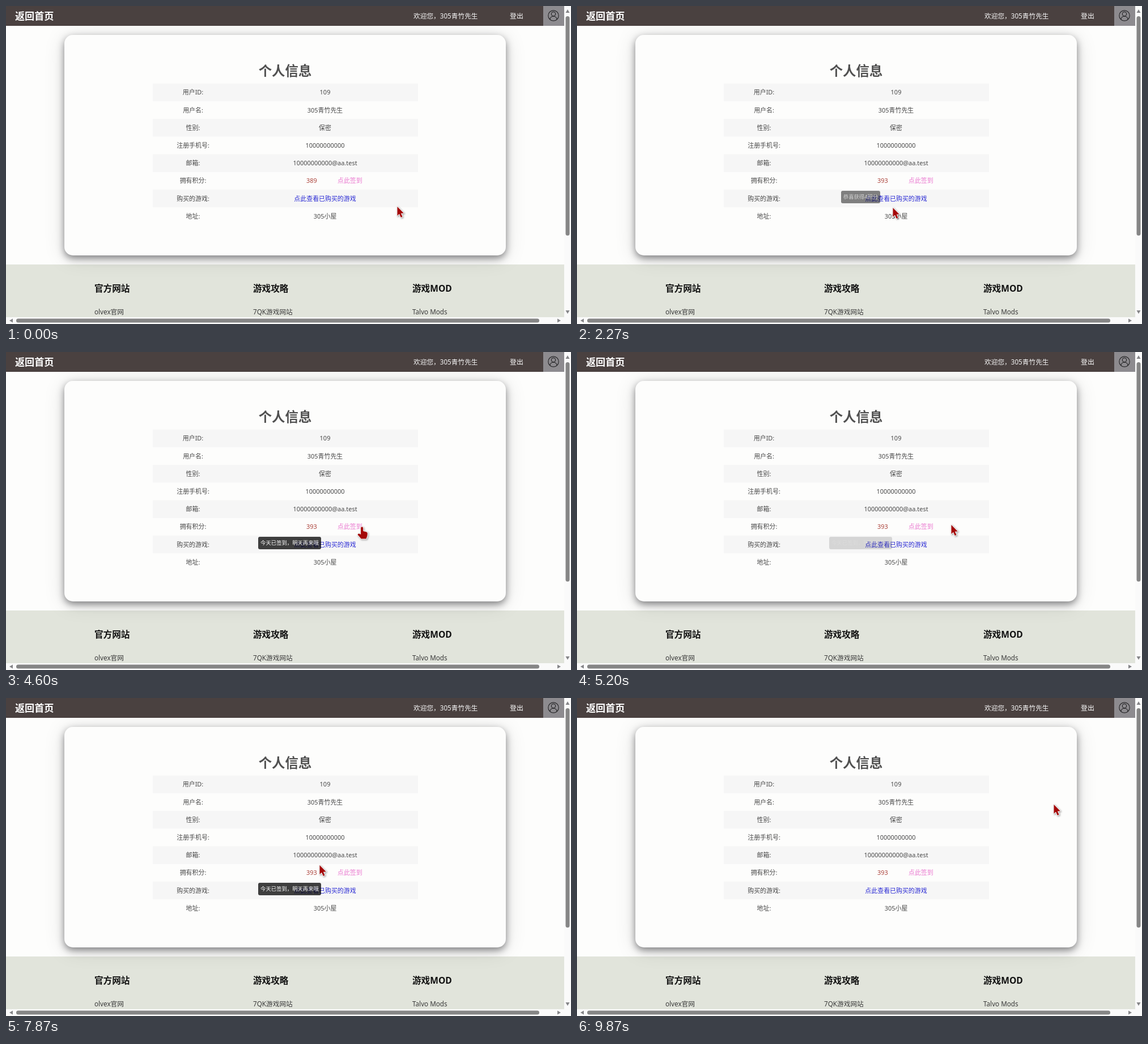
Write an HTML page with a canvas that moves like this. It is 997 px wide and 561 px high and loops after 9940 ms.

```html
<!DOCTYPE html>
<html lang="zh-CN">
<head>
<meta charset="utf-8">
<title>个人信息</title>
<style>
html, body { margin: 0; width: 100%; height: 100%; overflow: hidden; background: #fdfdfc; }
canvas { display: block; }
</style>
</head>
<body>
<canvas id="stage" width="997" height="561"></canvas>
<script>
const W = 997, H = 561, LOOP = 9940;
const FONT = '"Noto Sans", "Noto Sans CJK SC", "Noto Sans CJK", sans-serif';
const ROW_TOP = 136.7, ROW_H = 31.2, LABEL_X = 330, VALUE_X = 563;
const INK = '#484848', PAPER = '#fdfdfc';
const ctx = document.getElementById('stage').getContext('2d');

const rows = [
  ['用户ID:', '109'],
  ['用户名:', '305青竹先生'],
  ['性别:', '保密'],
  ['注册手机号:', '10000000000'],
  ['邮箱:', '10000000000@aa.test'],
  ['拥有积分:', ''],
  ['购买的游戏:', '点此查看已购买的游戏', '#2a2ad4'],
  ['地址:', '305小屋']
];
const columns = [
  [156, '官方网站', 'olvex官网'],
  [436, '游戏攻略', '7QK游戏网站'],
  [717, '游戏MOD', 'Talvo Mods']
];

// time, x, y of the pointer's hot spot
const path = [
  [0, 690, 353], [130, 690, 353], [650, 604, 308], [1450, 604, 308],
  [2150, 557, 355], [2500, 557, 355], [3200, 596, 312], [4200, 596, 312],
  [5000, 660, 304], [5300, 660, 304], [5750, 608, 305], [7000, 608, 305],
  [7700, 553, 294], [8200, 553, 294], [9400, 841, 187], [LOOP, 841, 187]
];
// text, left, width, then times: appear, full, start of fade, gone
const toasts = [
  ['恭喜获得4积分', 466, 69, 800, 1200, 2000, 2770],
  ['今天已签到，明天再来哦', 445, 111, 3480, 3880, 4600, 5330],
  ['今天已签到，明天再来哦', 445, 111, 5870, 6230, 8000, 8650]
];
const SCORE_TIME = 800;

function text(g, str, x, y, size, color, align = 'left', weight = 400) {
  g.font = `${weight} ${size}px ${FONT}`;
  g.textAlign = align;
  g.textBaseline = 'alphabetic';
  g.fillStyle = color;
  g.fillText(str, x, y + size * 0.37);
}

function box(g, x, y, w, h, r, fill) {
  g.fillStyle = fill;
  g.beginPath();
  g.roundRect(x, y, w, h, r);
  g.fill();
}

function polygon(g, points) {
  g.beginPath();
  points.forEach(([x, y]) => g.lineTo(x, y));
  g.closePath();
}

function triangle(g, x, y, dx, dy) {
  polygon(g, [[x + dx * 3, y + dy * 3],
    [x - dx * 3 + dy * 3.5, y - dy * 3 + dx * 3.5],
    [x - dx * 3 - dy * 3.5, y - dy * 3 - dx * 3.5]]);
  g.fillStyle = '#858588';
  g.fill();
}

function drawHeader(g) {
  g.fillStyle = '#4a4140';
  g.fillRect(0, 0, 985, 35);
  text(g, '返回首页', 16, 18, 17.1, '#fff', 'left', 700);
  text(g, '欢迎您，305青竹先生', 719, 17.5, 11.7, '#f6f6f6');
  text(g, '登出', 889, 17.5, 11.9, '#fff', 'left', 500);
  g.fillStyle = '#8d8b8f';
  g.fillRect(948, 0, 37, 35);
  g.strokeStyle = '#2a2a2c';
  g.lineWidth = 1.2;
  g.beginPath();
  g.arc(966, 17, 9.2, 0, 7);
  g.moveTo(969.7, 14);
  g.arc(966, 14, 3.7, 0, 7);
  g.moveTo(960, 23.6);
  g.bezierCurveTo(960.5, 16.2, 971.5, 16.2, 972, 23.6);
  g.stroke();
}

function drawFooter(g) {
  g.fillStyle = '#e1e4db';
  g.fillRect(0, 456, 985, 93);
  for (const [x, title, link] of columns) {
    text(g, title, x, 498, 15.6, '#111', 'left', 700);
    text(g, link, x, 539.5, 11.7, '#3a3a3a');
  }
}

function drawCard(g) {
  const layer = (color, blur, offset) => {
    g.shadowColor = color;
    g.shadowBlur = blur;
    g.shadowOffsetY = offset;
    box(g, 103, 51, 779, 389, 15, PAPER);
  };
  g.save();
  layer('rgba(0,0,0,.12)', 38, 4);
  layer('rgba(40,40,44,.55)', 13, 5);
  g.restore();
  text(g, '个人信息', 492.5, 114, 23.4, '#505050', 'center', 700);
  rows.forEach(([label, value, color = INK], i) => {
    const y = ROW_TOP + ROW_H * i;
    if (i % 2 === 0) {
      g.fillStyle = '#f6f6f6';
      g.fillRect(259, y, 468, ROW_H);
    }
    text(g, label, LABEL_X, y + 15.6, 10.95, INK, 'center');
    text(g, value, VALUE_X, y + 15.6, 10.95, color, 'center');
  });
  text(g, '点此签到', 585, 308.3, 10.95, '#ea78d0');
}

function drawScrollbars(g) {
  g.fillStyle = '#fafafa';
  g.fillRect(985, 0, 12, H);
  g.fillRect(0, 549, W, 12);
  box(g, 987.5, 18, 7, 387, 3.5, '#868686');
  box(g, 18, 551.5, 923, 7, 3.5, '#868686');
  triangle(g, 991, 9, 0, -1);
  triangle(g, 991, 540, 0, 1);
  triangle(g, 9, 555, -1, 0);
  triangle(g, 976, 555, 1, 0);
}

const page = document.createElement('canvas');
page.width = W;
page.height = H;
function drawPage(g) {
  g.fillStyle = PAPER;
  g.fillRect(0, 0, W, H);
  drawFooter(g);
  drawCard(g);
  drawHeader(g);
  drawScrollbars(g);
}

function pointerAt(t) {
  const i = Math.max(1, path.findIndex(p => p[0] > t));
  const [t0, x0, y0] = path[i - 1], [t1, x1, y1] = path[i];
  const k = (t - t0) / (t1 - t0), e = k * k * (3 - 2 * k);
  return [x0 + (x1 - x0) * e, y0 + (y1 - y0) * e];
}

function arrowShape(g) {
  polygon(g, [[0.5, 1], [0.5, 17], [4, 13.8], [6.8, 20], [9.6, 18.7], [6.9, 12.7], [11.8, 12.4]]);
}

function handShape(g) {
  g.beginPath();
  g.moveTo(-2, 2);
  g.quadraticCurveTo(0, -1.5, 2, 2);
  g.lineTo(2.2, 8);
  g.lineTo(8, 9.4);
  g.quadraticCurveTo(10, 10, 9.8, 13);
  g.quadraticCurveTo(9.6, 17.5, 7.5, 21.5);
  g.lineTo(-1.5, 21.5);
  g.quadraticCurveTo(-4, 18, -7.5, 14.5);
  g.quadraticCurveTo(-7, 11, -2, 14);
  g.closePath();
}

function drawPointer(g, x, y) {
  const inside = (l, t, r, b) => x >= l && x <= r && y >= t && y <= b;
  const overLink = inside(585, 301, 629, 316) || inside(509, 332, 618, 347);
  g.save();
  g.translate(x, y);
  (overLink ? handShape : arrowShape)(g);
  g.lineJoin = 'round';
  g.lineWidth = 2;
  g.strokeStyle = '#f4f4f4';
  g.shadowColor = 'rgba(0,0,0,.4)';
  g.shadowBlur = 3;
  g.shadowOffsetX = g.shadowOffsetY = 1.2;
  g.stroke();
  g.shadowColor = 'transparent';
  g.fillStyle = '#a40808';
  g.fill();
  g.restore();
}

function drawToast(g, t, [message, x, w, start, full, fade, end]) {
  const alpha = Math.min(1, (t - start) / (full - start), (end - t) / (end - fade));
  if (alpha <= 0) return;
  g.save();
  g.globalAlpha = alpha;
  box(g, x, 326, w, 22, 3, 'rgba(0,0,0,.75)');
  text(g, message, x + w / 2, 337, 9.36, '#fff', 'center');
  g.restore();
}

function frame() {
  const t = performance.now() % LOOP;
  ctx.drawImage(page, 0, 0);
  text(ctx, t < SCORE_TIME ? '389' : '393', 530, 308.3, 10.95, '#ac443c');
  toasts.forEach(toast => drawToast(ctx, t, toast));
  drawPointer(ctx, ...pointerAt(t));
  requestAnimationFrame(frame);
}

drawPage(page.getContext('2d'));
frame();
</script>
</body>
</html>
```
